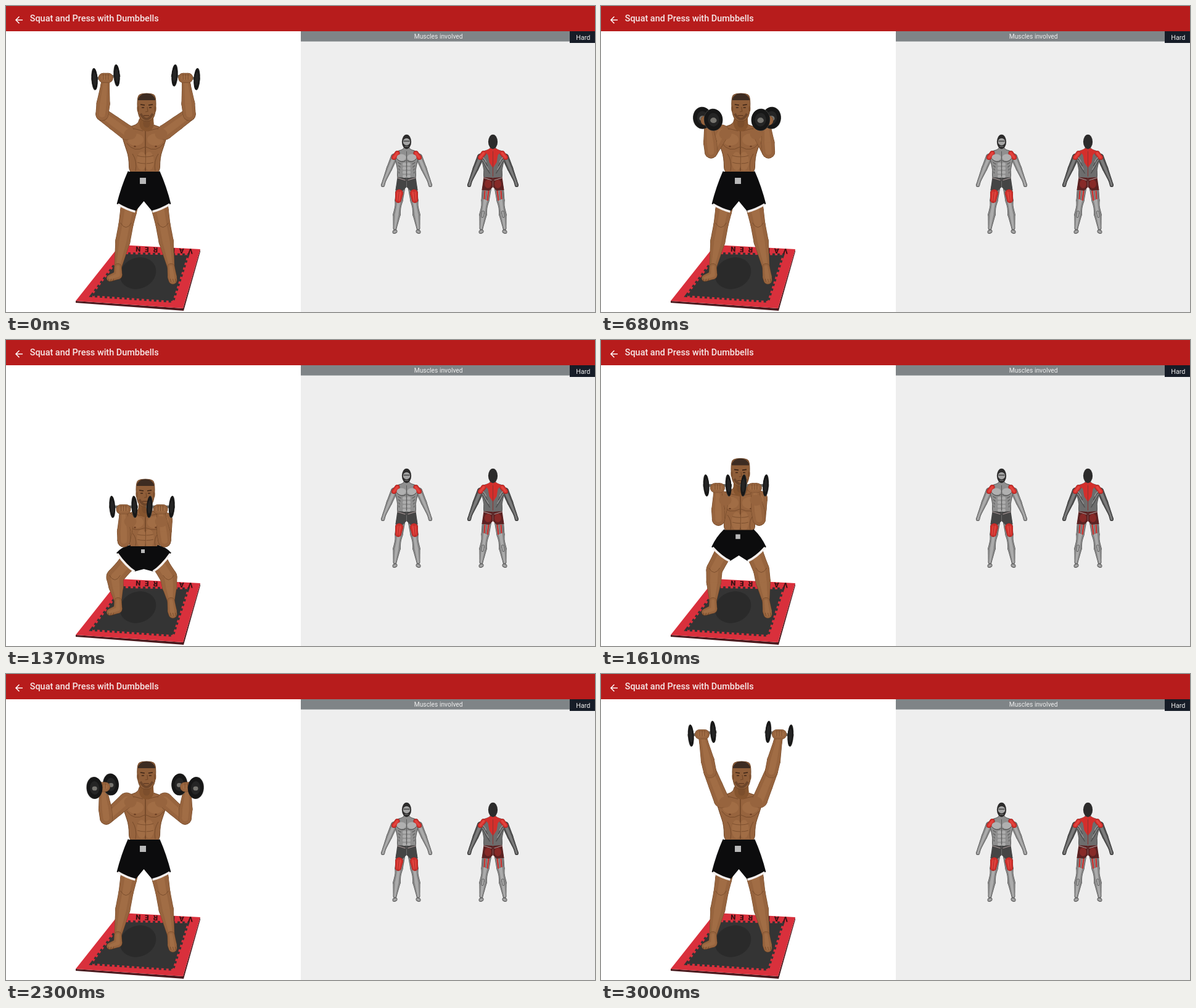
Write an HTML page with a canvas that moves like this. It is 955 px wide and 497 px high and loops after 3060 ms.

```html
<!DOCTYPE html>
<html lang="en">
<head>
<meta charset="utf-8">
<title>Squat and Press with Dumbbells</title>
<style>
html, body { margin: 0; width: 955px; height: 497px; overflow: hidden; background: #fff; }
canvas { display: block; }
</style>
</head>
<body>
<canvas id="stage" width="955" height="497"></canvas>
<script>
const c = document.getElementById('stage').getContext('2d');
const LOOP = 3060, STEP = 76.9;

const SKIN = { base: '#97643e', edge: '#704728', light: '#a16d45' };
const GREY = { base: '#858585', edge: '#484848', light: '#ababab' };
const DARK = { base: '#505050', edge: '#2b2b2b', light: '#7c7c7c' };
const RED = { base: '#cf2f2b', edge: '#8a2421', light: '#e2443e' };
const CREASE = 'rgba(80,45,20,.45)';

const mix = (a, b, k) => a + (b - a) * k;
const mixAll = (a, b, k) => a.map((v, i) => mix(v, b[i], k));
const ramp = (n, from, to) => Math.min(1, Math.max(0, (n - from) / (to - from)));
// Completes a right half, given as offsets from the axis, to a whole outline
const both = half => [...half, ...half.map(([x, y]) => [-x, y]).reverse()];

function fill(color) {
  c.fillStyle = color;
  c.fill();
}

function stroke(color, width) {
  c.strokeStyle = color;
  c.lineWidth = width;
  c.stroke();
}

function trace(pts) {
  c.beginPath();
  pts.forEach(p => c.lineTo(...p));
}

function poly(pts, color) {
  trace(pts);
  fill(color);
}

function line(pts, color, width = 1) {
  trace(pts);
  stroke(color, width);
}

function curve(x0, y0, cx, cy, x1, y1, color, width = 1) {
  c.beginPath();
  c.moveTo(x0, y0);
  c.quadraticCurveTo(cx, cy, x1, y1);
  stroke(color, width);
}

// Closed curve through the midpoints of a polygon
function blob(pts, color, edge) {
  const at = i => pts[i % pts.length];
  c.beginPath();
  for (let i = 0; i <= pts.length; i++) {
    const mid = mixAll(at(i), at(i + 1), .5);
    if (i) c.quadraticCurveTo(...at(i), ...mid);
    else c.moveTo(...mid);
  }
  fill(color);
  stroke(edge, 1);
}

function oval(x, y, rx, ry, color, turn = 0) {
  c.beginPath();
  c.ellipse(x, y, rx, ry, turn, 0, 7);
  fill(color);
}

// Tapered chain of [x, y, radius] with an outline and a soft highlight
function limb(pts, tone, rim = .5) {
  const layer = (scale, grow, color) => pts.forEach(([x, y, size], i) => {
    const r = size * scale + grow;
    oval(x, y, r, r, color);
    if (!i) return;
    const [px, py, pSize] = pts[i - 1], q = pSize * scale + grow;
    const len = Math.hypot(x - px, y - py) || 1;
    const nx = (py - y) / len, ny = (x - px) / len;
    poly([[px + nx * q, py + ny * q], [x + nx * r, y + ny * r],
      [x - nx * r, y - ny * r], [px - nx * q, py - ny * q]], color);
  });
  layer(1, rim, tone.edge);
  layer(1, 0, tone.base);
  layer(.5, 0, tone.light);
}

function placed(x, y, draw, flip = 1) {
  c.save();
  c.translate(x, y);
  c.scale(flip, 1);
  draw(flip);
  c.restore();
}

function mirrored(x, y, draw) {
  placed(x, y, draw);
  placed(x, y, draw, -1);
}

function label(text, x, y, font, color) {
  c.font = font + ' Roboto, sans-serif';
  c.fillStyle = color;
  c.fillText(text, x, y);
}

function box(x, y, w, h, color) {
  c.fillStyle = color;
  c.fillRect(x, y, w, h);
}

function chrome() {
  box(0, 0, 955, 497, '#fff');
  box(478, 41, 477, 456, '#eee');
  box(478, 41, 477, 16.6, '#7f8487');
  box(0, 0, 955, 41, '#b71c1c');
  box(914, 41, 41, 19, '#161c27');
  line([[27, 22.7], [16, 22.7]], '#fff', 1.5);
  line([[21.5, 17.2], [16, 22.7], [21.5, 28.2]], '#fff', 1.5);
  label('Squat and Press with Dumbbells', 38.7, 25, '500 14.45px', '#f6e9e9');
  label('Muscles involved', 661.7, 53, '10.3px', '#eee');
  label('Hard', 924.2, 54.6, '10.8px', '#eee');
}

function anatomy(cx, back) {
  const armTone = back ? DARK : GREY;
  mirrored(cx, 0, () => {
    limb([[10, 296, 7], [12.5, 316, 6], [14, 326, 4.5], [16, 339, 5.6], [19, 361, 2.4]], GREY);
    limb([[18, 366, 2.5], [20, 367, 2.5]], GREY);
    limb([[20, 245, 5], [28, 264, 4.3], [36, 283, 2.4], [38.5, 291, 2.6]], armTone);
  });
  placed(cx, 0, () => blob(both([[4, 228], [5, 233], [20, 237], [18, 252], [14, 266], [16, 284]]),
    back ? '#6d6d6d' : '#8f8f8f', '#555'));
  mirrored(cx, 0, () => {
    limb([[15, 239, 3.6], [20.5, 246, 3.6]], RED);
    poly([[0, 279], [15, 278], [18, 299], [6, 300], [0, 294]], back ? '#5c2222' : '#454545');
    line([[2, 283], [15, 279]], '#a99', 1.2);
    for (let i = 0; i < 4; i++) {
      if (back) {
        curve(5 + i * 2, 272 - i * 6, 12, 262 - i * 4, 16, 252 - i * 2, i % 2 ? '#999' : '#4a4a4a', 1.3);
        line([[7 + i * 3, 300], [9 + i * 2.5, 316 - i]], i % 2 ? '#777' : '#c93330', 2.4);
      } else {
        oval(3.6, 257 + i * 6.5, 2.9, 2.6, '#adadad');
        line([[9 + i, 257 + i * 5], [14 - i * .5, 254 + i * 5]], '#5c5c5c', 1.1);
      }
    }
    if (back) {
      poly([[0, 229], [4, 231], [14, 236], [8, 242], [6, 254], [0, 263]], '#d32f2c');
      oval(8, 289, 5.5, 7, '#872a28');
      limb([[16, 335, 2.2], [17, 342, 1.6]], GREY, .3);
    } else {
      oval(8.5, 246, 7.5, 5.5, '#b0b0b0');
      curve(1, 251, 9, 256, 16, 248, '#444');
      limb([[12, 304, 6], [13.5, 315, 4.6]], RED);
      line([[12, 300], [14, 319]], '#962622', .8);
    }
  });
  line([[cx, 236], [cx, 277]], back ? '#8d3330' : '#5b5b5b');
  oval(cx, 220.5, 7.6, 11.8, '#2c2b2b');
  if (back) return;
  oval(cx, 220.5, 5.8, 5.8, '#a5a5a5');
  line([[cx - 5, 219.5], [cx + 5, 219.5]], '#444', 1.6);
  line([[cx - 3, 228], [cx + 3, 228]], '#888');
}

function mat() {
  poly([[113, 479], [287, 491], [315, 395], [315, 399], [288, 495], [113, 482]], '#4a1a1e');
  poly([[185, 388], [315, 395], [287, 491], [113, 479]], '#d9303c');
  const pad = [[190, 403], [294, 405], [270, 479], [140, 470]];
  poly(pad, '#343434');
  c.setLineDash([4, 4]);
  line([...pad, pad[0]], '#343434', 6);
  c.setLineDash([]);
  oval(214, 434, 30, 25, '#2a2a2a', -.4);
  c.save();
  c.translate(303, 394.5);
  c.rotate(Math.PI + .04);
  c.letterSpacing = '7px';
  label('VALDREN', 0, 0, '900 11.5px', '#3a1114');
  c.restore();
}

function legs(s) {
  mirrored(224.5, 0, flip => {
    const left = flip < 0;
    const hip = [mix(20, 17, s), mix(302, 350, s), 15];
    const knee = [mix(30, left ? 48 : 39, s), mix(355, 385, s), mix(11.5, 13.5, s)];
    const ankle = [43, 424, 5.5];
    limb([hip, [...mixAll(hip, knee, .6).slice(0, 2), 13], knee,
      [...mixAll(knee, ankle, .4).slice(0, 2), 11.6], ankle], SKIN);
    limb(left ? [ankle, [43, 437, 6.5], [56, 442, 5]] : [ankle, [45, 440, 7], [46, 445, 6.5]], SKIN);
    curve(knee[0] - 9, knee[1] - 3, knee[0], knee[1] + 12, knee[0] + 9, knee[1] - 3, CREASE);
    for (let i = 0; i < 3; i++) {
      const toe = (left ? 50 : 42) + i * 4;
      line([[toe, 443], [toe + 1, 448]], CREASE);
    }
  });
}

function torso(s) {
  // The trunk folds a little as it sinks
  const at = (x, y) => [x, y + s * (86 - 20 * (y - 190) / 80)];
  const half = [[8, 180], [10, 192], [28, 197], [38, 206], [32, 226], [25, 246], [25, 276]];
  placed(224.5, 0, () => blob(both(half.map(p => at(...p))), SKIN.base, SKIN.edge));
  mirrored(226, 0, () => {
    const arc = (a, b, d) => curve(...at(...a), ...at(...b), ...at(...d), CREASE);
    oval(...at(16, 217), 13, 10, SKIN.light);
    oval(...at(6, 252), 8, 15, SKIN.light);
    arc([1, 229], [18, 239], [30, 223]);
    arc([4, 203], [14, 200], [25, 198]);
    arc([21, 240], [13, 252], [16, 268]);
    arc([0, 203], [-1, 230], [0, 268]);
    for (const y of [243, 254]) arc([0, y + 2], [8, y + 2], [13, y]);
    oval(...at(17, 228), 1.8, 1.2, '#6d4024');
  });
}

function shorts(s) {
  const stand = [[24, 269], [35, 294], [42, 322], [14, 334], [0, 317]];
  const low = [[21.5, 335], [35, 338], [43, 347], [15, 376], [0, 372]];
  const half = stand.map((p, i) => mixAll(p, low[i], s));
  const [waist, hip, outer, inner] = half;
  placed(223.5, 0, () => poly(both(half), '#0c0c0d'));
  mirrored(223.5, 0, () => {
    curve(...waist, ...hip, ...outer, '#0c0c0d', 4);
    curve(...outer, mix(outer[0], inner[0], .5), mix(outer[1], inner[1], .7), ...inner, '#f4f0ee', 3.6);
  });
  const size = mix(10, 6, s);
  box(222 - size / 2, mix(279, 340, s), size, size, '#b9b9b9');
}

function head(s, front) {
  placed(228 - 2 * front, 84 * s, () => {
    limb([[0, 180, 10.5], [0, 192, 11]], { base: '#86552f', edge: '#86552f', light: '#7c4e2c' });
    blob(both([[8, 142], [15, 146], [15, 172], [9, 187]]), '#8f5e39', SKIN.edge);
    c.beginPath();
    c.ellipse(0, 153, 14, 11, 0, Math.PI, 0);
    fill('#3d2c22');
    curve(-10, 175, 0, 192, 10, 175, 'rgba(60,35,20,.4)', 4);
    line([[1, 164], [2, 171], [-2, 172]], CREASE, 1.2);
    line([[-5, 178], [4, 178]], '#5a351f', 1.3);
  });
  mirrored(228 - 2 * front, 84 * s, () => {
    line([[3, 161], [10, 160]], '#3b2416', 1.6);
    line([[4, 165], [8, 165]], '#3b2416', 1.4);
    oval(14, 167, 1.5, 4.5, '#7c4e2c');
  });
}

function plate(x, y, yaw) {
  const face = Math.abs(Math.sin(yaw)), r = 4.6 + 12 * face;
  oval(x + .6, y, r, 18, '#454543', .06);
  oval(x, y, r, 17.5, '#171717', .06);
  oval(x, y, r * .6, 11, '#252525', .06);
  oval(x, y + 1, 6 * face, 5 * face, '#777570');
}

// Outer side of a two-bone chain, reaching from shoulder to hand
function elbowOf([sx, sy], [hx, hy], upper, fore) {
  const dx = hx - sx, dy = hy - sy, d = Math.hypot(dx, dy);
  const along = (upper ** 2 - fore ** 2 + d * d) / (2 * d);
  const out = Math.sqrt(Math.max(0, upper ** 2 - along ** 2));
  return [sx + (dx * along - dy * out) / d, sy + (dy * along + dx * out) / d];
}

function arms(press, front, s) {
  const yaw = mix(.5 * (1 - press) ** 2, Math.PI, front);
  mirrored(226.5, 87 * s, flip => {
    // Both forearms swing to the viewer's left when held in front
    const sway = flip * front * (4 * s - 10);
    const shoulder = [31, 205];
    const side = [72.5 - 10 * press, 184 - 85 * press];
    const bend = elbowOf(shoulder, side, 46 + 4 * press, 50 + 11 * press);
    const [hx, hy] = mixAll(side, [30, 189], front);
    const hand = [hx + sway, hy];
    const elbow = mixAll(bend, [33 + sway * .4, 239], front);
    const joint = (a, b, k, r) => [...mixAll(a, b, k), r];
    limb([[...shoulder, 12], joint(shoulder, elbow, .5, 11), [...elbow, 10]], SKIN);
    limb([[...elbow, 10], joint(elbow, hand, .3, 10.5), joint(elbow, hand, .8, 6.8), [...hand, 6]], SKIN);
    oval(25, 208, 10, 9, SKIN.base);

    const reach = 18 * Math.cos(yaw), drop = 3 * Math.cos(yaw / 2);
    const [x, y] = [hand[0], hand[1] - 2 - 3 * front];
    line([[x - reach * 1.3, y - drop], [x + reach * 1.3, y + drop]], '#6f6d68', 4.5);
    plate(x - reach, y - drop, yaw);
    limb([[x - 4, hy - 1, 7.5], [x + 4, hy - 1, 7.5]], SKIN);
    for (let d = -4; d < 6; d += 4) line([[x + d, hy - 7], [x + d, hy + 2]], CREASE);
    plate(x + reach, y + drop, yaw);
  });
}

function draw(now) {
  const n = Math.floor((now % LOOP + 15) / STEP);
  const press = 1 - ramp(n, -1.7, 6) + ramp(n, 30, 39);
  const front = ramp(n, 6, 11) - ramp(n, 24, 30.6);
  const squat = ramp(n, 11, 18) - ramp(n, 19, 24);
  chrome();
  anatomy(649.5, false);
  anatomy(789.5, true);
  mat();
  legs(squat);
  torso(squat);
  shorts(squat);
  head(squat, front);
  arms(press, front, squat);
  requestAnimationFrame(draw);
}
requestAnimationFrame(draw);
</script>
</body>
</html>
```
